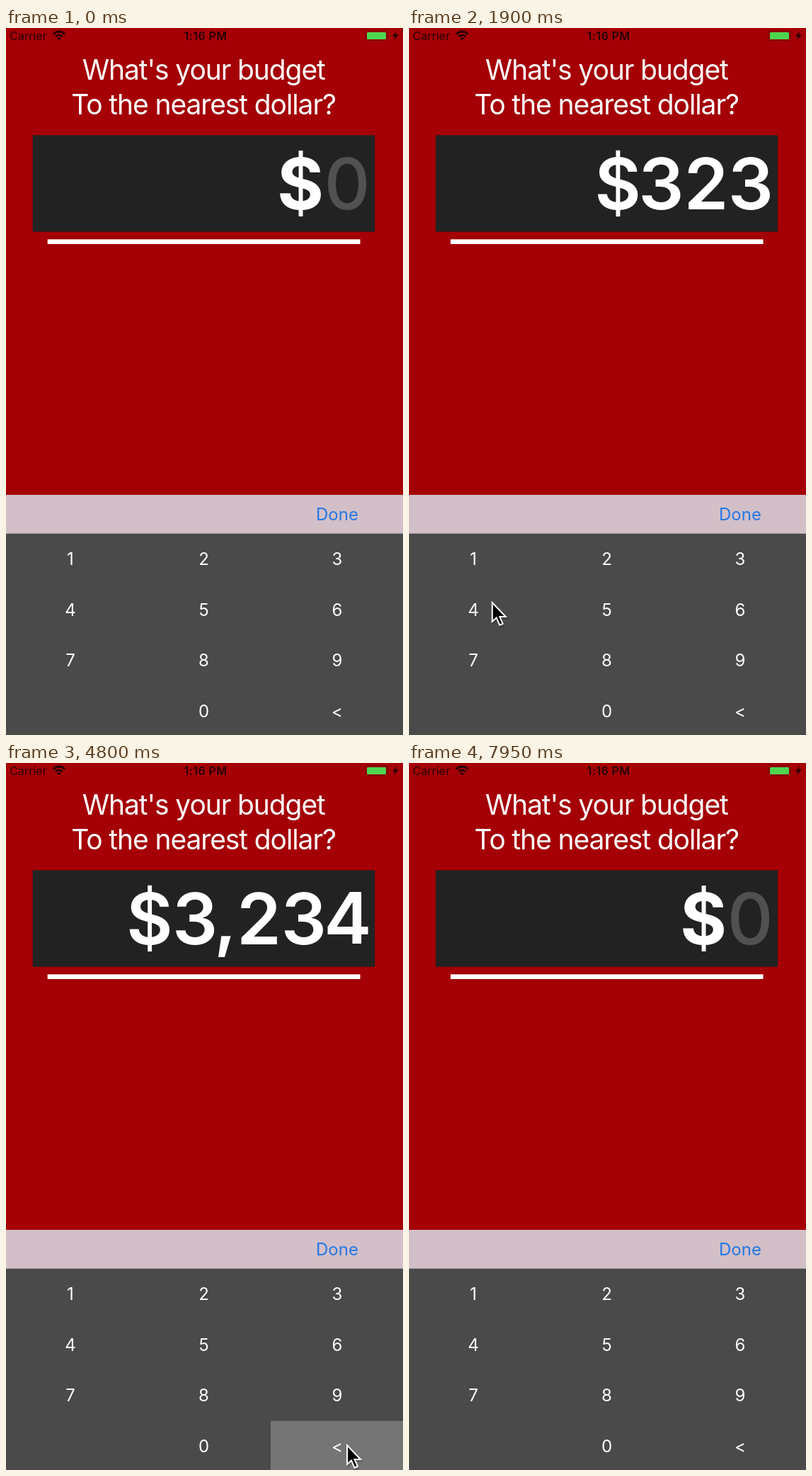
An HTML page that plays this animation: 561x998 px, repeating every 8 s.

```html
<!DOCTYPE html>
<html lang="en">
<head>
<meta charset="utf-8">
<title>Budget entry</title>
<style>
  html, body { margin: 0; width: 100%; height: 100%; overflow: hidden; background: #a40005; }
  svg { display: block; width: 561px; height: 998px; }
  text { font-family: Inter, Roboto, sans-serif; font-optical-sizing: none; text-anchor: middle; }
  .title { font-size: 39px; letter-spacing: -1.1px; fill: #fff; }
  .status { font-size: 16px; fill: #260003; }
  .key { font-size: 24px; fill: #fff; }
  .amount { font-size: 101px; font-weight: 600; fill: #fff; }
</style>
</head>
<body>
<svg viewBox="0 0 561 998">
  <rect width="561" height="998" fill="#a40005"/>

  <g fill="#260003">
    <text class="status" x="31.5" y="17">Carrier</text>
    <text class="status" x="282" y="17" font-weight="600" letter-spacing=".4">1:16 PM</text>
    <g fill="none" stroke="#260003" stroke-width="2.7">
      <path d="M66.7 8.7Q75 1.300 83.300 8.700"/>
      <path d="M70 12.200Q75 8 80 12.200"/>
    </g>
    <path d="M72.200 14.500Q75 12.300 77.800 14.500L75 17.600Z"/>
    <rect x="508.500" y="4.500" width="30" height="13" rx="3" fill="none" stroke="#260003" opacity=".45"/>
    <path d="M540 8.500q2 2.500 0 5z" opacity=".45"/>
    <rect x="510" y="6" width="27" height="10" rx="1.500" fill="#4cd64f"/>
    <path d="M552.500 4.500L546 12h4l-2 5.500 7-8h-4.200z"/>
  </g>

  <text class="title" x="279.200" y="73">What's your budget</text>
  <text class="title" x="279" y="121.500">To the nearest dollar?</text>

  <rect x="37.700" y="151.300" width="483.500" height="136.300" fill="#222"/>
  <rect x="58.700" y="298.300" width="441.800" height="6.700" fill="#fff"/>
  <g id="amount"></g>

  <rect y="659" width="561" height="55" fill="#d2bfc8"/>
  <text x="468" y="695" font-size="24" fill="#2478e5">Done</text>
  <rect y="713.700" width="561" height="284.300" fill="#4a4a4a"/>
  <g id="keys"></g>

  <g id="cursor">
    <path d="M0 0V27L6 21.500 10.500 32 15 30 10.500 20H19Z" transform="translate(1 2)"
      stroke="#000" stroke-width="3" opacity=".2"/>
    <path d="M0 0V27L6 21.500 10.500 32 15 30 10.500 20H19Z" stroke="#fff" stroke-width="2"/>
  </g>
</svg>
<script>
const LOOP = 8000, HOLD = 90, FADE = 300, MOVE = 220, SHIFT = 150, RISE = 61;
const BASE = 256;
const KEY_X = [0, 186, 374, 561], KEY_MID = [91, 279.5, 468];
const KEY_TOP = 714, KEY_H = 71.6;
const LABELS = ['1', '2', '3', '4', '5', '6', '7', '8', '9', '', '0', '<'];

// release time of each tap and the key tapped
const TAPS = [
  [650, '3'], [1080, '2'], [1450, '3'], [2050, '4'],
  [4800, '<'], [5088, '<'], [5340, '<'], [5600, '<']
];
// pointer stops: time, x, y
const PATH = [
  [400, 505, 705], [560, 490, 740], [700, 490, 740], [970, 310, 739], [1310, 310, 739],
  [1390, 486, 742], [1530, 486, 742], [1930, 112, 812], [2120, 112, 812], [2500, 69, 918],
  [3000, 92, 928], [3800, 376, 938], [4250, 482, 963], [5950, 482, 963]
];

function set(el, attrs) {
  for (const name in attrs) el.setAttribute(name, attrs[name]);
}
const make = (tag, parent, attrs) => {
  const el = document.createElementNS('http://www.w3.org/2000/svg', tag);
  set(el, attrs);
  return parent.appendChild(el);
};
const byId = id => document.getElementById(id);
const clamp = v => Math.min(1, Math.max(0, v));
const easeOut = v => 1 - (1 - clamp(v)) ** 2;
const mix = (a, b, k) => a + (b - a) * k;

const values = [''];
for (const [, key] of TAPS) {
  const last = values[values.length - 1];
  values.push(key === '<' ? last.slice(0, -1) : last + key);
}

const glows = {};
LABELS.forEach((label, i) => {
  const col = i % 3, top = KEY_TOP + Math.floor(i / 3) * KEY_H;
  if (!label) return;
  glows[label] = make('rect', byId('keys'), {
    x: KEY_X[col], y: top, width: KEY_X[col + 1] - KEY_X[col], height: KEY_H, fill: '#767676', opacity: 0
  });
  make('text', byId('keys'), { class: 'key', x: KEY_MID[col], y: top + 44 }).textContent = label;
});

// glyph name -> character and centre
function layout(value) {
  const n = value.length;
  const out = { $: { ch: '$', x: [416, 419, 357.5, 295, 201.5][n] } };
  if (!n) out.zero = { ch: '0', x: 482 };
  if (n > 3) out.comma = { ch: ',', x: 310 };
  [...value].forEach((ch, i) => {
    out['d' + i] = { ch, x: [483, 420, 356.5, 266][n - 1 - i] };
  });
  return out;
}
const layouts = values.map(layout);

const glyphs = {};
for (const id of ['zero', 'd0', 'd1', 'd2', 'd3', 'comma', '$']) {
  glyphs[id] = make('text', byId('amount'), { class: 'amount' });
}
Object.assign(glyphs.zero.style, { fill: '#515151', fontWeight: 500 });

function drawAmount(t) {
  const step = TAPS.filter(tap => tap[0] <= t).length;
  const now = layouts[step], before = layouts[Math.max(0, step - 1)];
  const age = step ? t - TAPS[step - 1][0] : LOOP;
  const k = easeOut(age / MOVE), slide = easeOut(age / SHIFT);
  for (const id in glyphs) {
    const a = before[id], b = now[id], el = glyphs[id];
    let x = 0, y = BASE, opacity = 0;
    if (a && b) {
      x = mix(a.x, b.x, slide);
      opacity = 1;
    } else if (a || b) {
      x = (a || b).x;
      opacity = b ? k : 1 - k;
      if (id !== 'zero') y -= RISE * (1 - opacity);
    }
    set(el, { x, y, opacity });
    const ch = (b || a || {}).ch || '';
    if (el.textContent !== ch) el.textContent = ch;
  }
  glyphs.$.style.fontWeight = values[step] ? 600 : 700;
}

function drawKeys(t) {
  for (const label in glows) {
    let level = 0;
    for (const [up, key] of TAPS) {
      if (key === label && t >= up - HOLD) level = Math.max(level, clamp(1 - (t - up) / FADE));
    }
    set(glows[label], { opacity: level });
  }
}

function drawCursor(t) {
  const end = PATH.findIndex(stop => stop[0] > t);
  const shown = end > 0;
  byId('cursor').style.display = shown ? '' : 'none';
  if (!shown) return;
  const [t0, x0, y0] = PATH[end - 1], [t1, x1, y1] = PATH[end];
  const p = (t - t0) / (t1 - t0), k = p * p * (3 - 2 * p);
  set(byId('cursor'), { transform: `translate(${mix(x0, x1, k)} ${mix(y0, y1, k)})` });
}

const start = performance.now();
function draw(now) {
  const t = Math.max(0, now - start) % LOOP;
  drawAmount(t);
  drawKeys(t);
  drawCursor(t);
  requestAnimationFrame(draw);
}
draw(start);
</script>
</body>
</html>
```
